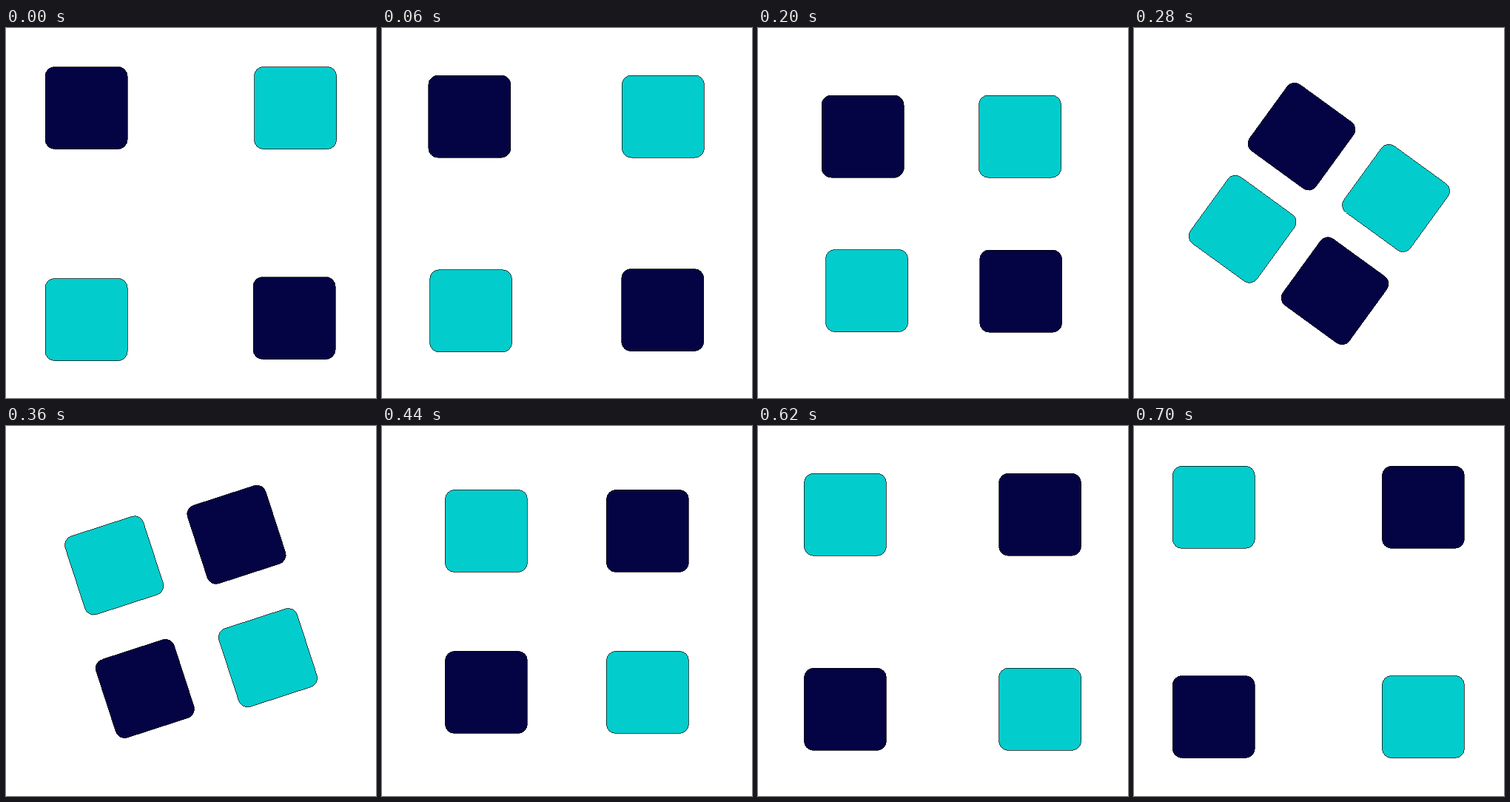
Write an HTML page that moves like this. It is 500 px wide and 500 px high and loops after 1000 ms.

```html
<!DOCTYPE html>
<html lang="en">
<head>
<meta charset="utf-8">
<title>Four squares</title>
<style>
  html, body { margin: 0; width: 100%; height: 100%; overflow: hidden; background: #fff; }
  svg { display: block; width: 100vw; height: 100vh; }
</style>
</head>
<body>
<svg id="stage" viewBox="0 0 500 500" shape-rendering="crispEdges"></svg>
<script>
const LOOP = 1000, STEP = 20;
const GATHERED = 200, TURNED = 400, SPREAD = 700;
const SIZE = 111, RADIUS = 12.5;
const NAVY = '#040444', CYAN = '#03cccc';

// Clockwise from top left: first position and position when gathered.
const SQUARES = [
  { fill: NAVY, start: [108.5, 108], near: [141.5, 146.5] },
  { fill: CYAN, start: [391, 108], near: [354, 146.5] },
  { fill: NAVY, start: [389.5, 392], near: [355.2, 355.6] },
  { fill: CYAN, start: [108.5, 394], near: [147, 355] }
];

const stage = document.getElementById('stage');
const progress = (t, from, to) => Math.max(0, Math.min(1, (t - from) / (to - from)));
const mix = (a, b, k) => a.map((v, i) => v + (b[i] - v) * k);

// Corner i (clockwise from top left) of a square around cx, cy.
function corner(i, cx, cy, half) {
  const right = i === 1 || i === 2;
  return [cx + (right ? half : -half), cy + (i > 1 ? half : -half)];
}

SQUARES.forEach((square, i) => {
  const next = (i + 1) % SQUARES.length;
  square.turned = corner(next, 250, 250.8, 104);
  square.end = corner(next, 249.3, 251.4, 141.6);
  square.rect = document.createElementNS('http://www.w3.org/2000/svg', 'rect');
  const attrs = {
    x: -SIZE / 2, y: -SIZE / 2, width: SIZE, height: SIZE, rx: RADIUS,
    fill: square.fill, stroke: '#000', 'stroke-width': 0.7
  };
  for (const name in attrs) square.rect.setAttribute(name, attrs[name]);
  stage.appendChild(square.rect);
});

function place({ start, near, turned, end }, t) {
  if (t < GATHERED) return mix(start, near, progress(t, 0, GATHERED));
  if (t < TURNED) return mix(near, turned, progress(t, GATHERED, TURNED));
  return mix(turned, end, progress(t, TURNED, SPREAD));
}

function draw(ms) {
  const t = Math.floor((ms % LOOP) / STEP) * STEP;
  const angle = 90 * progress(t, GATHERED, TURNED);
  for (const square of SQUARES) {
    const [x, y] = place(square, t);
    square.rect.setAttribute('transform', `translate(${x} ${y}) rotate(${angle})`);
  }
}

const start = performance.now();
function tick() {
  draw(performance.now() - start);
  requestAnimationFrame(tick);
}
tick();
</script>
</body>
</html>
```
